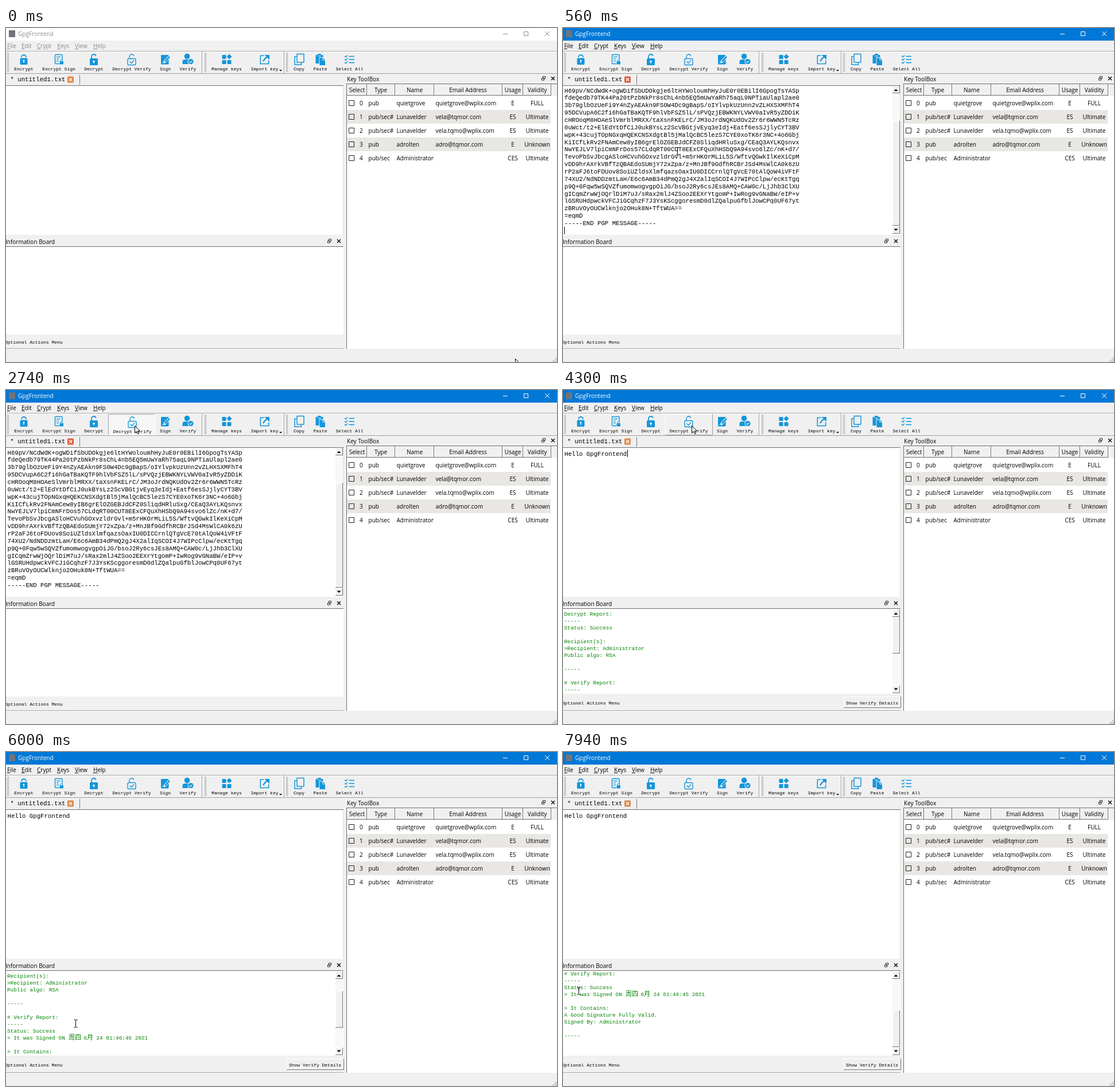
An HTML page with a canvas that plays this animation: 960 by 583 pixels, repeating every 8000 ms.

```html
<!DOCTYPE html>
<html lang="en">
<head>
<meta charset="utf-8">
<title>GpgFrontend</title>
<style>
html, body { margin: 0; width: 100%; height: 100%; overflow: hidden; background: #f0f0f0; }
canvas { display: block; width: 960px; height: 583px; }
</style>
</head>
<body>
<canvas id="stage" width="960" height="583"></canvas>
<script>
const c = document.getElementById('stage').getContext('2d');
const LOOP = 8000;
const UI = '10px "Open Sans", "Noto Sans", sans-serif';
const mono = size => `${size}px "Liberation Mono", "DejaVu Sans Mono", monospace`;
const LABEL = mono(8), CODE = mono(10.67), REPORT = mono(9.33);
const BLUE = '#1296db', BG = '#f0f0f0', EDGE = '#6e6e6e', GREEN = '#008200';

// Key moments in ms
const ACTIVE = 140, PASTE = 230, PRESS = 2200, BUSY = 2430, BUSY_END = 2740, DONE = 4300;

const MESSAGE = [
  'H69pV/NCdWdK+ogWDifSbUDOkgje6ltHYWoloumhHyJuE0r0EBilI6GpogTsYASp',
  'fdeQedb79TK44Pa20tPzbNkPr8sChL4nb5EQ5mUwYaRh75aqL9NPTiaUlapl2ae0',
  '3b79glbOzUeFi9Y4nZyAEAkn9FS0W4Dc9gBapS/oIYlvpkUzUnn2vZLHXSXMFhT4',
  '95DCVupA6C2fi6hGaTBaKQTF9hlVbFSZ5lL/sPVQzjEBWKNYLVWV0aIvR5yZDDiK',
  'cHROoqM8HOAeSlVmrblMRXX/taXsnFKELrC/JM3oJrdNQKUdOv2Zr6r6WWN5TcRz',
  '0uWct/t2+ElEdYtDfCiJ0ukBYsLz2ScVBGtjvEyq3eIdj+Eatf6esSJjlyCYT3BV',
  'wpK+43cujTOpNGxqHQEKCNSXdgtBl5jMalQcBC5lezS7CYE0xoTK6r3NC+4o6Gbj',
  'KiICfLkRv2FNAmCew8yIB6grElOZGEBJdCFZ0SliqdHRluSxg/CEaQ3AYLKQsnvx',
  'NwYEJLV7lpiCmNFrDos57CLdqRT00CUT8EExCFQuXhHSbQ9A94svo6lZc/nK+d7/',
  'TevoPbSvJbcgASloHCVuhGOxvzldrGvl+m5rHKOrMLiL5S/WftvQGwkIlKeXiCpM',
  'vDD9hrAXrkVBfTzQBAEdoSUmjY72xZpa/z+MnJBf9GdfhRCBrJSd4MsWlCA0k6zU',
  'rP2aFJ6toFDUov8SoiUZldsXlmfqazsOaxIU0DICCrnlQTgVcE70tAlQoW4iVFtF',
  '74XU2/NdNDDzmtLaH/E6c6AmB34dPmQ2gJ4X2alIqSCOI4J7WIPcClpw/ecKtTgq',
  'p9Q+0Fqw5wSQVZfumomwogvgpOiJG/bsoJ2Ry6csJEs8AMQ+CAW0c/LjJhb3ClXU',
  'gICqmZrwWjOQrlDiM7uJ/sRax2mlJ4ZSoo2EEXrYtgomP+IwRog9vGNaBW/eIP+v',
  'lGSRUHdpwckVFCJiGCqhzF7J3YsKScggoresmD0dlZQalpuGfblJowCPq0UF67yt',
  'zBRuVOyOUCWlknjo2OHuk8N+TftWUA==',
  '=eqmD',
  '-----END PGP MESSAGE-----'
];
const RESULT = [
  'Decrypt Report:', '-----', 'Status: Success', '', 'Recipient(s):',
  '>Recipient: Administrator', 'Public algo: RSA', '', '-----', '',
  '# Verify Report:', '-----', 'Status: Success', '> It was Signed ON', '',
  '> It Contains:', 'A Good Signature Fully Valid.', 'Signed By: Administrator', '', '-----'
];
const KEYS = [
  ['pub', 'quietgrove', 'quietgrove@wplix.com', 'E', 'FULL'],
  ['pub/sec#', 'Lunavelder', 'vela@tqmor.com', 'ES', 'Ultimate'],
  ['pub/sec#', 'Lunavelder', 'vela.tqmo@wplix.com', 'ES', 'Ultimate'],
  ['pub', 'adrolten', 'adro@tqmor.com', 'E', 'Unknown'],
  ['pub/sec', 'Administrator', '', 'CES', 'Ultimate']
];

// Pointer moves: start, end, steps, target x, target y
const MOVES = [
  [70, 560, 7, 199.5, 214.5],
  [730, 790, 2, 217.5, 219.5],
  [1350, 2030, 10, 224, 62],
  [4830, 5600, 11, 121.5, 460],
  [5680, 5830, 3, 121.5, 474],
  [6470, 6930, 7, 71.5, 446],
  [7005, 7230, 4, 46.5, 459],
  [7560, 7940, 6, 27.5, 417]
];
const BLINKS = [[PASTE, 790], [1350, 1880], [DONE, 4530], [5060, 5600], [6150, 6650], [7180, 7710]];

function rect(x, y, w, h, color) { c.fillStyle = color; c.fillRect(x, y, w, h); }
function text(s, x, y, font = UI, color = '#000', align = 'left') {
  c.font = font; c.fillStyle = color; c.textAlign = align;
  c.fillText(s, x, y);
}
function line(points, color, width = 1) {
  c.strokeStyle = color; c.lineWidth = width;
  c.beginPath();
  points.forEach(([x, y], i) => i ? c.lineTo(x, y) : c.moveTo(x, y));
  c.stroke();
}
function poly(points, color) {
  c.fillStyle = color;
  c.beginPath();
  points.forEach(p => c.lineTo(...p));
  c.closePath(); c.fill();
}
function box(x, y, w, h, r, color, width) {
  c.beginPath(); c.roundRect(x, y, w, h, r);
  if (width) { c.strokeStyle = color; c.lineWidth = width; c.stroke(); }
  else { c.fillStyle = color; c.fill(); }
}
function arc(x, y, r, color, width, from = 0, to = Math.PI * 2) {
  c.beginPath(); c.arc(x, y, r, from, to);
  if (width) { c.strokeStyle = color; c.lineWidth = width; c.stroke(); }
  else { c.fillStyle = color; c.fill(); }
}
function bevel(x, y, w, h, light, dark) {
  rect(x, y, w, 1, light); rect(x, y, 1, h, light);
  rect(x, y + h - 1, w, 1, dark); rect(x + w - 1, y, 1, h, dark);
}

function pointer(t) {
  let x = 887, y = 577;
  for (const [t0, t1, n, tx, ty] of MOVES) {
    if (t < t0) break;
    const k = t >= t1 ? 1 : (Math.floor((t - t0) / (t1 - t0) * (n - 1) + 1e-6) + 1) / n;
    const e = k * k * (3 - 2 * k);
    x += (tx - x) * e; y += (ty - y) * e;
  }
  return { x, y };
}

function drawTitle(on) {
  rect(0, 0, 960, 22, on ? '#0078d7' : '#fff');
  const ink = on ? '#fff' : '#8f8f8f';
  rect(5, 4, 11, 12, '#73737b');
  text('GpgFrontend', 21, 14, UI, ink);
  line([[866, 10.5], [874, 10.5]], ink);
  box(902.5, 6.5, 7, 7, 0, ink, 1);
  line([[939, 6], [947, 14]], ink);
  line([[947, 6], [939, 14]], ink);
  const menu = on ? '#000' : '#8c8c8c';
  [['File', 2], ['Edit', 27], ['Crypt', 54], ['Keys', 89], ['View', 120], ['Help', 152]].forEach(([s, x]) => {
    text(s, x, 35, UI, menu);
    rect(x, 36, c.measureText(s[0]).width, 1, menu);
  });
}

const ICONS = {
  lock(x) {
    arc(x, 51, 4, BLUE, 1.8, Math.PI, 0);
    box(x - 6.5, 52.5, 13, 11.5, 1.5, BLUE);
    arc(x, 57, 1.4, '#fff'); rect(x - 0.6, 57, 1.2, 4, '#fff');
  },
  docLock(x) {
    box(x - 6.5, 46.5, 12.5, 16, 1.5, BLUE, 1.5);
    for (const y of [50.5, 54, 57.5]) line([[x - 4, y], [x + (y > 53 ? 0 : 3), y]], BLUE, 1.3);
    rect(x + 1, 55, 8, 9, BG);
    arc(x + 4.7, 57.5, 2, BLUE, 1.2, Math.PI, 0);
    box(x + 1.5, 58, 6.5, 5.5, 1, BLUE);
  },
  unlock(x) {
    arc(x, 50, 4, BLUE, 1.8, Math.PI, -0.3);
    line([[x - 4, 50], [x - 4, 54]], BLUE, 1.8);
    box(x - 7, 53, 14, 12, 1.5, BLUE);
    arc(x, 58.5, 1.8, '#fff');
    rect(x - 0.5, 58, 1, 4, '#fff');
  },
  unlockCheck(x) {
    arc(x, 50, 4, BLUE, 1.4, Math.PI, -0.3);
    line([[x - 4, 50], [x - 4, 54]], BLUE, 1.4);
    box(x - 7, 53.5, 14, 11, 1.5, BLUE, 1.4);
    line([[x - 3.5, 58.5], [x - 0.5, 61.5], [x + 4, 56.5]], BLUE, 1.4);
  },
  pen(x) {
    box(x - 7.5, 47, 13.5, 16.5, 1, BLUE);
    line([[x - 2, 60], [x + 7.5, 49.5]], BG, 4.6);
    line([[x - 0.5, 58.5], [x + 7.5, 49.8]], BLUE, 2.6);
    line([[x - 5, 60.5], [x - 1, 60.5]], '#fff', 1);
  },
  person(x) {
    arc(x - 1.5, 49.5, 4.8, BLUE);
    box(x - 9.5, 55, 16, 8, [4, 4, 0, 0], BLUE);
    arc(x + 5, 58.5, 5.6, BG); arc(x + 5, 58.5, 4.6, BLUE);
    line([[x + 2.8, 58.5], [x + 4.5, 60.2], [x + 7.4, 57]], '#fff', 1.1);
  },
  grid(x) {
    box(x - 8, 47, 7, 7, 1, BLUE); box(x - 8, 56, 7, 7, 1, BLUE); box(x + 1, 56, 7, 7, 1, BLUE);
    poly([[x + 4.5, 45.5], [x + 9, 50], [x + 4.5, 54.5], [x, 50]], BLUE);
  },
  inbox(x) {
    line([[x - 1, 48.2], [x - 7.2, 48.2], [x - 7.2, 62.5], [x + 7.2, 62.5], [x + 7.2, 56.5]], BLUE, 1.6);
    poly([[x, 47], [x + 8.5, 47], [x + 8.5, 55.5]], BLUE);
    line([[x + 5.5, 50], [x + 1, 53], [x - 2.5, 58]], BLUE, 2.2);
  },
  copy(x) {
    box(x - 3.5, 45.5, 12, 14.5, 0.5, BLUE, 1.5);
    line([[x - 4, 50], [x - 7.5, 50], [x - 7.5, 64], [x + 4, 64], [x + 4, 60.5]], BLUE, 1.5);
  },
  paste(x) {
    box(x - 8, 47, 13, 15, 1, BLUE); box(x - 4.5, 45, 6, 3.5, 1, BLUE);
    rect(x - 4.5, 48.4, 6, 1, BG);
    poly([[x - 2, 51], [x + 5, 51], [x + 9.5, 55.5], [x + 9.5, 66], [x - 2, 66]], BG);
    poly([[x - 1, 52], [x + 4, 52], [x + 4, 56.5], [x + 8.5, 56.5], [x + 8.5, 65], [x - 1, 65]], BLUE);
    poly([[x + 5, 52], [x + 8.5, 55.5], [x + 5, 55.5]], BLUE);
  },
  list(x) {
    for (const y of [49.5, 55, 60.5]) {
      line([[x - 8.5, y - 0.5], [x - 6.5, y + 1.3], [x - 3.5, y - 2]], BLUE, 1.3);
      line([[x - 1, y], [x + 8.5, y]], BLUE, 1.6);
    }
  }
};
const TOOLS = [
  ['lock', 31, 'Encrypt'], ['docLock', 92, 'Encrypt Sign'], ['unlock', 153, 'Decrypt'],
  ['unlockCheck', 219, 'Decrypt Verify'], ['pen', 277.5, 'Sign'], ['person', 317, 'Verify'],
  ['grid', 384.5, 'Manage keys'], ['inbox', 450.5, 'Import key'], ['copy', 510.5, 'Copy'],
  ['paste', 547.5, 'Paste'], ['list', 598.5, 'Select All']
];

function drawTools(hover, pressed) {
  rect(0, 40, 960, 1, '#a8a8a8'); rect(0, 41, 960, 1, '#fff');
  rect(0, 79, 960, 1, '#a0a0a0');
  for (const x of [2, 346, 488]) {
    rect(x, 43, 1, 34, '#b0b0b0'); rect(x + 2, 43, 1, 34, '#b0b0b0');
  }
  for (const x of [341, 484]) { rect(x, 41, 1, 38, '#a0a0a0'); rect(x + 1, 41, 1, 38, '#fff'); }
  if (hover) {
    if (pressed) rect(178, 42, 83, 37, '#f7f7f7');
    bevel(178, 42, 83, 37, pressed ? '#a0a0a0' : '#fff', pressed ? '#fff' : '#a0a0a0');
  }
  TOOLS.forEach(([icon, x, label], i) => {
    c.save();
    if (i === 3 && pressed) c.translate(1, 1);
    ICONS[icon](x);
    text(label, x, 73.5, LABEL, '#000', 'center');
    c.restore();
  });
  poly([[476, 73], [481, 73], [478.5, 75.5]], '#000');
}

function dockButtons(x, y) {
  box(x - 1.5, y - 3.5, 4, 3.5, 0, '#222', 1);
  box(x - 3.5, y - 0.5, 4, 3.5, 0, '#222', 1);
  line([[x + 13, y - 3], [x + 19, y + 3]], '#111', 1.5);
  line([[x + 19, y - 3], [x + 13, y + 3]], '#111', 1.5);
}

function scrollbar(y, bottom, thumb, size) {
  const part = (py, h) => {
    rect(574, py, 13, h, BG);
    bevel(574, py, 13, h, '#fff', '#777');
  };
  rect(574, y, 13, bottom - y, '#f8f8f8');
  part(y, 13); part(bottom - 13, 13); part(thumb, size);
  poly([[576.5, y + 9], [583.5, y + 9], [580, y + 5.5]], '#000');
  poly([[576.5, bottom - 8.5], [583.5, bottom - 8.5], [580, bottom - 5]], '#000');
}

function drawTab(red) {
  text('* untitled1.txt', 7.5, 93, CODE);
  box(107, 84.5, 11, 11, 1.5, red ? '#de6043' : '#dc8a4c');
  line([[110, 87.5], [115, 92.5]], '#fff', 1.5);
  line([[115, 87.5], [110, 92.5]], '#fff', 1.5);
  rect(128, 82, 1, 17, '#777');
}

function drawEditor(t) {
  rect(0, 100, 588, 1, EDGE);
  rect(0, 101, 588, 260, '#fff');
  const caret = BLINKS.some(([a, b]) => t >= a && t < b);
  if (t >= DONE) {
    text('Hello GpgFrontend', 2.5, 114.5, CODE);
    if (caret) rect(112, 104, 1, 13, '#000');
  } else if (t >= PASTE) {
    MESSAGE.forEach((s, i) => text(s, 2.5, 112.5 + i * 12.86, CODE));
    if (caret) rect(2, 347, 1, 13, '#000');
    scrollbar(101, 359, 162, 183);
  }
  rect(587, 101, 1, 260, '#e0e0e0');
}

function drawBoard(t) {
  const done = t >= DONE, end = done ? 530 : 535;
  text('Information Board', -1, 376.5);
  dockButtons(564, 372);
  rect(0, 381, 588, 1, EDGE);
  rect(0, 382, 588, end - 382, '#fff');
  text('Optional Actions Menu', -2, done ? 548.5 : 551, LABEL);
  if (!done) return;
  const scroll = t < 6000 ? 0 : t < 6070 ? 48 : t < 6150 ? 96 : 124;
  c.save();
  c.beginPath(); c.rect(0, 383, 573, 146); c.clip();
  RESULT.forEach((s, i) => {
    const y = 394 + i * 12 - scroll;
    text(s, 2, y, REPORT, GREEN);
    if (i !== 13) return;
    const cjk = '11px "Noto Sans CJK SC", "Noto Sans CJK", "Noto Sans CJK JP", sans-serif';
    text('周四', 109, y, cjk, GREEN);
    text('6', 135.5, y, REPORT, GREEN);
    text('月', 141, y, cjk, GREEN);
    text('24 01:46:45 2021', 157.5, y, REPORT, GREEN);
  });
  c.restore();
  scrollbar(383, 529, 396 + scroll / 124 * 55, 64);
  bevel(489, 535, 100, 20, '#fff', '#777');
  text('Show Verify Details', 538.5, 548.5, LABEL, '#000', 'center');
}

function drawKeys() {
  text('Key ToolBox', 594, 92.5);
  dockButtons(937, 88);
  rect(593, 97, 367, 1, EDGE); rect(593, 98, 1, 462, EDGE);
  rect(594, 98, 366, 462, '#fff');
  rect(594, 98, 366, 20, BG);
  rect(594, 117, 356, 1, EDGE);
  for (const x of [628, 677, 745, 864, 900, 949]) { rect(x, 98, 1, 20, EDGE); rect(x + 1, 98, 1, 19, '#fff'); }
  [['Select', 611.5], ['Type', 653], ['Name', 712], ['Email Address', 805], ['Usage', 883], ['Validity', 925.5]]
    .forEach(([s, x]) => text(s, x, 111.5, UI, '#000', 'center'));
  KEYS.forEach(([type, name, mail, usage, valid], i) => {
    const y = 131 + i * 24;
    if (i % 2) rect(594, y - 12, 355, 24, '#e9e7e3');
    box(597.5, y - 4.5, 9, 9, 0, '#222', 1);
    text(i, 616, y + 3.5);
    text(type, 631.5, y + 3.5);
    text(name, 680.5, y + 3.5);
    text(mail, 748.5, y + 3.5);
    text(usage, 883, y + 3.5, UI, '#000', 'center');
    text(valid, 925.5, y + 3.5, UI, '#000', 'center');
  });
}

function drawPointer({ x, y }, busy) {
  const overText = x < 574 && ((y > 101 && y < 360) || (y > 382 && y < 530));
  if (overText) {
    x = Math.floor(x) + 0.5; y = Math.round(y);
    line([[x, y - 6], [x, y + 6]], '#000');
    for (const d of [-6.5, 6.5]) {
      line([[x - 3, y + d], [x - 0.5, y + d]], '#000');
      line([[x + 0.5, y + d], [x + 3, y + d]], '#000');
    }
    return;
  }
  c.save();
  c.translate(Math.round(x) + 0.5, Math.round(y) + 0.5);
  c.beginPath();
  [[0, 0], [0, 12.5], [3, 9.8], [5, 14.2], [7, 13.3], [5, 9], [9, 9]].forEach(p => c.lineTo(...p));
  c.closePath();
  c.fillStyle = '#fff'; c.fill();
  c.strokeStyle = '#000'; c.lineWidth = 1; c.stroke();
  c.restore();
  if (busy) arc(235, 62.5, 5, '#2a8fd8', 2.4);
}

function draw(t) {
  const p = pointer(t);
  const hover = p.x >= 178 && p.x < 261 && p.y >= 42 && p.y < 79;
  rect(0, 0, 960, 583, BG);
  drawTitle(t >= ACTIVE);
  drawTools(hover, t >= PRESS && t < DONE);
  drawTab(t >= PASTE && t < DONE);
  drawEditor(t);
  drawBoard(t);
  drawKeys();
  rect(0, 559, 588, 1, '#a8a8a8'); rect(0, 560, 588, 1, '#fafafa');
  for (const d of [2, 5, 8]) line([[960 - d, 583], [960, 583 - d]], '#999');
  drawPointer(p, t >= BUSY && t < BUSY_END);
}

function frame() {
  draw(performance.now() % LOOP);
  requestAnimationFrame(frame);
}
frame();
</script>
</body>
</html>
```
